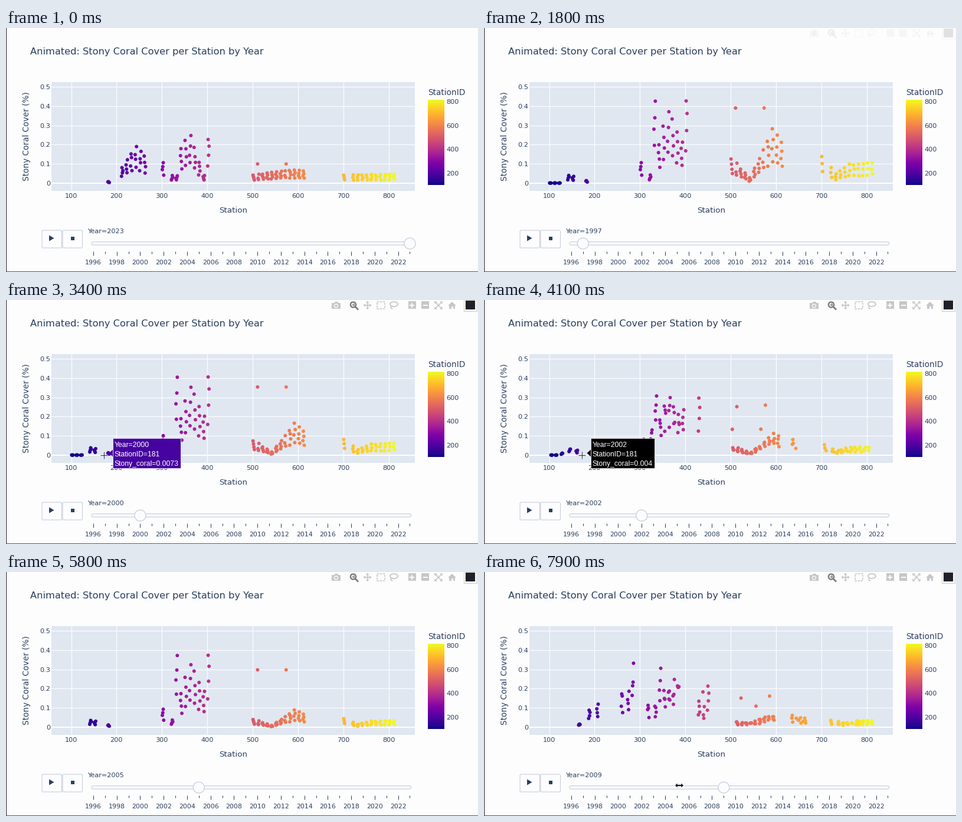
A matplotlib script that plays this animation: 800 by 415 pixels, repeating every 8 s.

```python
import numpy as np
import matplotlib.pyplot as plt
from matplotlib.animation import FuncAnimation
from matplotlib.patches import Circle, Ellipse, FancyBboxPatch, Polygon, Rectangle

W, H = 800, 415
PAGE, PLOT, GRID, INK = '#fdfdfe', '#e0e7f1', '#fdfdfe', '#2a3f5f'
EDGE, ICON, ACTIVE = '#c6cedc', '#c7c7c7', '#7c7c7c'
CMAP, LOW_ID, HIGH_ID = plt.get_cmap('plasma'), 102, 814
STEP_MS, START_MS, MOVE_MS, SLIDE_MS = 520, 840, 500, 150

SITES = [10, 11, 12, 14, 15, 18, *range(21, 27), 30, *range(32, 41),
         *range(50, 62), 70, *range(72, 82)]
HARDY = {511, 574}  # two stations that stay far above their neighbours

# Mean cover along the reef as (site, cover) key points.
EARLY = np.array([(10, .001), (12, .001), (14, .03), (18, .01), (21, .13), (25, .32),
                  (30, .08), (32, .03), (33, .31), (34, .15), (36, .27), (39, .16),
                  (40, .32), (50, .09), (54, .02), (59, .2), (61, .15), (70, .1),
                  (73, .035), (76, .07), (81, .075)])
LATE = np.array([(18, .006), (21, .06), (24, .14), (26, .1), (30, .08), (32, .028),
                 (33, .028), (34, .135), (36, .18), (39, .03), (40, .17),
                 (50, .03), (58, .05), (70, .03), (81, .033)])


def station_factors(n, rng):
    """Evenly spread but shuffled deviations from the site mean."""
    return rng.permutation(np.linspace(.58, 1.38, n)) + rng.uniform(-.06, .06, n)


rng = np.random.default_rng(11)
FACTORS = {s: station_factors(3 if s >= 70 else 4, rng) for s in SITES}


def surveyed(year):
    """The southern end drops out step by step; other sites join in 2009."""
    first = 10 if year < 2002 else 11 if year < 2004 else 14 if year < 2009 else 18
    return [s for s in SITES if s >= first
            and (not 20 < s < 27 or year > 2010 or year == 2009 and s < 26)]


def survey(year):
    """Station and cover columns for a year."""
    late = np.interp(year, [2006, 2023], [0, 1])
    south = np.interp(year, [1997, 2006], [1, .85])
    north = np.interp(year, [1997, 1999, 2002, 2006], [1, .7, .35, .3])
    hardy = np.interp(year, [1997, 2006, 2023], [.39, .28, .1])
    rows = []
    for s in surveyed(year):
        start = np.interp(s, *EARLY.T) * (south if s < 50 else north)
        mean = start + (np.interp(s, *LATE.T) - start) * late
        for k, f in enumerate(FACTORS[s], 1):
            station = s * 10 + k
            rows.append((station, hardy if station in HARDY else mean * f))
    return np.array(rows)


def blend(old, new, p):
    """Points move by list position; surplus new ones appear in place."""
    out = new.copy()
    n = min(len(old), len(new))
    out[:n] = old[:n] + (new[:n] - old[:n]) * p
    return out


def sx(station):
    return 110.5 + (station - 100) * .7686


def sy(cover):
    return 264 - cover * 328


def year_x(year):
    return 148 + (year - 1996) * 19.87


def ease(p):
    return 4 * p ** 3 if p < .5 else 1 - (2 - 2 * p) ** 3 / 2


fig = plt.figure(figsize=(W / 100, H / 100), dpi=100, facecolor=PAGE)
ax = fig.add_axes([0, 0, 1, 1])


def text(x, y, s, size=11.2, ha='center', color=INK, font='DejaVu Sans', **kw):
    if not kw:
        y += size * .36
    return ax.text(x, y, s, fontsize=size * .72, ha=ha, color=color, family=font,
                   **{'va': 'baseline', **kw})


def rect(x0, y0, x1, y1, fc, ec='none', lw=.72, z=1):
    return ax.add_patch(Rectangle((x0, y0), x1 - x0, y1 - y0, fc=fc, ec=ec, lw=lw, zorder=z))


def rounded(x0, y0, x1, y1, r, fc):
    box = FancyBboxPatch((x0 + r, y0 + r), x1 - x0 - 2 * r, y1 - y0 - 2 * r,
                         boxstyle=f'round,pad={r}', fc=fc, ec=EDGE, lw=.8, zorder=1)
    return ax.add_patch(box)


def shape(pts, fc, **kw):
    return ax.add_patch(Polygon(pts, fc=fc, **{'zorder': 2, **kw}))


def line(xs, ys, color=INK, lw=.72, z=2):
    return ax.plot(xs, ys, color=color, lw=lw, zorder=z, solid_capstyle='butt')[0]


def draw_chart():
    rect(77, 92, 693, 277, PLOT)
    for s in range(100, 900, 100):
        line([sx(s)] * 2, [92, 277], GRID, .9)
        text(sx(s), 285, str(s))
    for k in range(6):
        y = sy(k / 10)
        line([77, 693], [y, y], GRID, .9 if k else 1.5)
        text(75.5, y, f'{k / 10:g}', ha='right')
    text(41, 39, 'Animated: Stony Coral Cover per Station by Year', 16.2, 'left')
    text(385, 309.5, 'Station', 13.4)
    text(35, 184, 'Stony Coral Cover (%)', 13.6, rotation=90, va='center')
    text(715, 109.5, 'StationID', 13.6, 'left')
    ax.imshow(np.linspace(1, 0, 145)[:, None], cmap=CMAP, aspect='auto',
              extent=(715, 743, 267, 122), zorder=1)
    for s in (200, 400, 600, 800):
        text(746, 125 + (800 - s) * .2035, str(s), ha='left')


def draw_controls():
    for x in (61, 96):
        rounded(x, 344, x + 33.5, 374, 2, PAGE)
    shape([(73, 352.5), (73, 362.5), (81.5, 357.5)], INK)
    rect(110, 355, 115.5, 360.5, INK)
    rounded(145, 363.7, 686.5, 369.2, 2.7, '#f8fafc')
    for y in range(1996, 2024):
        x = year_x(y)
        line([x, x], [380, 384 if y % 2 else 386.5])
        if y % 2 == 0:
            text(x, 398, str(y), 11)


def draw_modebar():
    """Toolbar icons along the top right."""
    camera = [rect(552, 5, 567, 15, ICON), rect(556.5, 3, 562.5, 6, ICON),
              ax.add_patch(Circle((559.5, 10), 3, fc=ICON, ec=PAGE, lw=1, zorder=2))]
    zoom = [ax.add_patch(Circle((588.5, 8), 4.6, fc='none', ec=ACTIVE, lw=1.7, zorder=2)),
            line([592, 597], [11.5, 16.5], ACTIVE, 2),
            line([586, 591], [8, 8], ACTIVE, 1), line([588.5] * 2, [5.5, 10.5], ACTIVE, 1)]
    pan = [line([606, 619], [9, 9], ICON, 1.3), line([612.5] * 2, [2.5, 15.5], ICON, 1.3)]
    for d in np.array([(1, 0), (-1, 0), (0, 1), (0, -1)]):
        tip, side = d * 7 + (612.5, 9), d[::-1] * 3
        pan.append(shape([tip, tip - d * 3 + side, tip - d * 3 - side], ICON))
    select = rect(629, 3, 642, 15, 'none', ICON, 1.2)
    select.set_linestyle((0, (2, 1)))
    lasso = [ax.add_patch(Ellipse((657.5, 7), 13, 8, fc='none', ec=ICON, lw=1.3)),
             line([653, 652, 655], [10, 13, 15.5], ICON, 1.2)]
    plus_minus = [line([688, 688], [5, 13], PAGE, 1.4)]
    for x in (688, 710.5):
        plus_minus += [rect(x - 6.5, 2.5, x + 6.5, 15.5, ICON),
                       line([x - 4, x + 4], [9, 9], PAGE, 1.4)]
    scale = [line([728, 738], [4, 14], ICON, 1.2), line([728, 738], [14, 4], ICON, 1.2)]
    for cx in (-1, 1):
        for cy in (-1, 1):
            x, y = 733 + 6 * cx, 9 + 6 * cy
            scale.append(line([x - 3 * cx, x, x], [y, y, y - 3 * cy], ICON, 1.2))
    home = [shape([(749, 9.5), (756, 3), (763, 9.5)], ICON),
            rect(751, 9, 754.5, 15, ICON), rect(757.5, 9, 761, 15, ICON),
            rect(751, 9, 761, 11, ICON)]
    badge = [rect(776, -1, 798, 19.5, '#f6f6f2', '#d0d0c0'), rect(779, 1.5, 795, 16.5, '#20202a')]
    return [*camera, *zoom, *pan, select, *lasso, *plus_minus, *scale, *home, *badge]


draw_chart()
draw_controls()
modebar = draw_modebar()
rect(0, 0, 1.2, H, '#1c1c24', z=8)
rect(0, 414, W, H, '#55555c', z=8)

dots = ax.scatter([], [], s=18.5, c=[], cmap=CMAP, vmin=LOW_ID, vmax=HIGH_ID, lw=0, zorder=3)
handle = ax.add_patch(Circle((0, 366.5), 9.5, fc='#fbfcfe', ec=EDGE, lw=.9, zorder=4))
label = text(138, 344.7, '', ha='left')

tip_box = rect(0, 0, 1, 1, 'k', PAGE, .5, 5)
tip_arrow = shape([(0, 0)] * 3, 'k', zorder=5)
tip_rows = [text(0, 0, '', 12.1, 'left', 'white', 'Liberation Sans') for _ in range(3)]
for row in tip_rows:
    row.set_zorder(6)
tip = [tip_box, tip_arrow, *tip_rows]

cross = [line([], [], c, w, 7) for c, w in ((PAGE, 2), (PAGE, 2), (INK, .9), (INK, .9))]
half = np.array([(-3, 1.4), (-3, 4.4), (-7.5, 0), (-3, -4.4), (-3, -1.4)])
double_arrow = np.vstack([half, -half])
resize = shape(double_arrow, '#101014', ec=PAGE, lw=.5, zorder=7)

ax.set_xlim(0, W)
ax.set_ylim(H, 0)
ax.axis('off')


def show_tip(t):
    # The hover box lags a little behind the points.
    year = 1996 + (t - START_MS - 100) // STEP_MS
    low, high = 2300 <= t < 4500, 4800 <= t < 5400
    for a in tip:
        a.set_visible(low or high)
    if not (low or high):
        return
    if low:
        x, y, station = 180.5, 235, 181
        cover = .0098 * (.004 / .0098) ** ((year - 1999) / 3)
    else:
        x, y, station = 298, 147, 333
        cover = .2785 - .0134 * (year - 2003)
    color = 'black' if year == 2002 else CMAP((station - LOW_ID) / (HIGH_ID - LOW_ID))
    rows = [f'Year={year}', f'StationID={station}', f'Stony_coral={round(cover, 4):g}']
    tip_box.set_bounds(x, y, 6.8 * len(rows[2]) - 7.4, 51)
    tip_arrow.set_xy([(x - 6, y + 25.5), (x + .5, y + 19.5), (x + .5, y + 31.5)])
    for a in (tip_box, tip_arrow):
        a.set_facecolor(color)
    for k, (a, s) in enumerate(zip(tip_rows, rows)):
        a.set_text(s)
        a.set_position((x + 3, y + 14.5 + 16.2 * k))


def show_cursor(t):
    times = [2000, 2300, 4500, 4800, 5400, 5900]
    x = np.interp(t, times, [150, 166, 166, 306, 306, 331])
    y = np.interp(t, times, [276, 264, 264, 165, 165, 363])
    in_plot = t >= 2000 and y < 277
    for k, a in enumerate(cross):
        a.set_visible(in_plot)
        if k % 2:
            a.set_data([x, x], [y - 6, y + 6])
        else:
            a.set_data([x - 6, x + 6], [y, y])
    resize.set_visible(t >= 5900)
    resize.set_xy(double_arrow + (x, y))


def update(i):
    t = i * 100
    if t < START_MS:
        year = prev = 2023
        ms = MOVE_MS
    else:
        n, ms = divmod(t - START_MS, STEP_MS)
        year = 1996 + n
        prev = year - 1 if n else 2023
    pts = blend(survey(prev), survey(year), min(1, ms / MOVE_MS))
    dots.set_offsets(np.column_stack([sx(pts[:, 0]), sy(pts[:, 1])]))
    dots.set_array(pts[:, 0])
    x0, x1 = year_x(prev), year_x(year)
    handle.center = (x0 + (x1 - x0) * ease(min(1, ms / SLIDE_MS)), 366.5)
    label.set_text(f'Year={year}')
    for a in modebar:
        a.set_alpha(np.interp(t, [1700, 1800, 2000], [0, .12, 1]))
    show_tip(t)
    show_cursor(t)
    return [dots]


anim = FuncAnimation(fig, update, frames=80, interval=100, repeat=True, repeat_delay=0)
plt.show()
```
